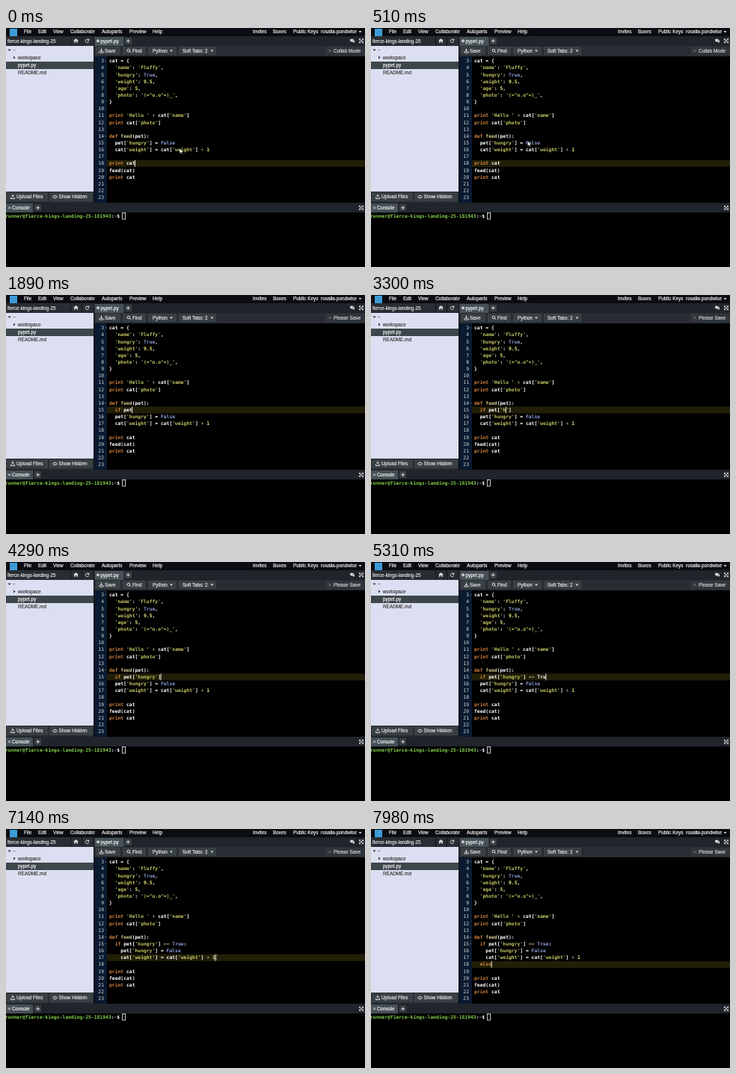
These frames come from a looping animation (480x320 px, 8000 ms). An HTML page:

```html
<!DOCTYPE html>
<html lang="en">
<head>
<meta charset="utf-8">
<title>Editing pypet.py</title>
<style>
  html, body { margin: 0; width: 100%; height: 100%; overflow: hidden; background: #000; }
  svg { display: block; width: 100vw; height: 100vh; }
  text { white-space: pre; }
  .ui { font: 6.4px "Liberation Sans", Arial, sans-serif; stroke-width: .15; }
  .code { font: bold 6.36px "DejaVu Sans Mono", monospace; fill: #fff; }
  .keyword { fill: #d5813c; }
  .string { fill: #c3c562; }
  .constant { fill: #8c9cd8; }
  .number { fill: #eaea80; }
  .name { fill: #cfc98a; }
  .operator { fill: #a59268; }
</style>
</head>
<body>
<svg id="stage" viewBox="0 0 480 320" xmlns="http://www.w3.org/2000/svg">
  <g id="chrome"></g>
  <g id="editor"></g>
  <path id="arrow" d="M0 0v7l1.7-1.5 1.2 2.6 1.1-.5-1.2-2.5h2.3z" fill="#fff" stroke="#000" stroke-width=".5"/>
  <path id="beam" d="M-1.5-3.5q1.5 0 1.5 1 0-1 1.5-1M0-2.5v5M-1.5 3.5q1.5 0 1.5-1 0 1 1.5 1" fill="none" stroke="#999" stroke-width=".8"/>
</svg>
<script>
const LOOP = 8000, STEP = 30;
const FIRST_LINE = 3, LAST_LINE = 23, LINE_HEIGHT = 9.15;
const CODE_X = 138, CHAR = 6.36 * 0.602;
const $ = id => document.getElementById(id);

const escapeText = s => s.replace(/&/g, '&amp;').replace(/</g, '&lt;');
const box = (x, y, w, h, fill, extra = '') =>
  `<rect x="${x}" y="${y}" width="${w}" height="${h}" fill="${fill}" ${extra}/>`;
const label = (x, y, s, color = '#eee', extra = '') =>
  `<text class="ui" x="${x}" y="${y + 2.2}" fill="${color}" stroke="${color}" ${extra}>${escapeText(s)}</text>`;
const icon = (x, y, d, color = '#ddd', fill = 'none') =>
  `<path transform="translate(${x} ${y})" d="${d}" fill="${fill}" stroke="${color}" stroke-width="1"/>`;
const solid = (x, y, d, color = '#ddd') =>
  `<path transform="translate(${x} ${y})" d="${d}" fill="${color}"/>`;

const DOWN = 'M-2-1h4l-2 2.6z', RIGHT = 'M-1-2l2.6 2-2.6 2z';
const PLUS = 'M-2.3 0h4.6M0-2.3v4.6', CROSS = 'M-1.5-1.5l3 3M1.5-1.5l-3 3';
const EXPAND = 'M-2.5-2.5l5 5M2.5-2.5l-5 5M-2.5-.8v-1.7h1.7M2.5-.8v-1.7h-1.7M-2.5.8v1.7h1.7M2.5.8v1.7h-1.7';

function drawChrome() {
  const bar = '#292d33', button = '#394044', line = '#11151c';
  const menu = [[24, 'File'], [43, 'Edit'], [63, 'View'], [86, 'Collaborate'], [128, 'Autoparts'],
    [165, 'Preview'], [196, 'Help'], [330, 'Invites'], [357, 'Boxes'], [384, 'Public Keys']];
  const prompt = 'runner@fierce-kings-landing-25-181943';
  $('chrome').innerHTML = [
    box(0, 0, 480, 320, '#000'),
    // menu bar
    box(0, 0, 480, 11, '#0b0d12'),
    box(5, 1, 10, 10, '#3d9bd8'),
    ...menu.map(([x, s]) => label(x, 5, s, '#fff')),
    label(469, 5, 'rosalia-pondwise', '#fff', 'text-anchor="end"'),
    solid(473.5, 5, DOWN),
    // file panel
    box(0, 11, 117, 13, bar),
    label(2, 17.3, 'fierce-kings-landing-25'),
    box(86, 11, 1, 13, line), box(101, 11, 1, 13, line),
    solid(93.5, 17, 'M0-3l3.4 3h-1v2.8h-1.6v-2h-1.6v2h-1.6v-2.8h-1z'),
    icon(108.5, 17.3, 'M2-1.2a2.3 2.3 0 1 0 .2 2M2.4-2.8v2h-2'),
    box(0, 24, 117, 195, '#dcdff1'),
    solid(4.5, 29.5, DOWN, '#333'), label(9, 29.5, '~', '#333'),
    solid(11, 39.5, RIGHT, '#333'), label(16, 39.5, 'workspace', '#333'),
    box(0, 45, 117, 10, '#3d474b'), label(16, 50, 'pypet.py', '#fff'),
    label(16, 60, 'README.md', '#333'),
    box(0, 219, 117, 15, bar),
    box(1, 220, 55, 12, button), box(58, 220, 58, 12, button),
    icon(9, 226, 'M-2.5.5v2h5v-2M0 1v-3.5M-1.6-1l1.6-1.6L1.6-1'),
    label(14, 226, 'Upload Files'),
    icon(65.5, 226, 'M-3 0q3-3.6 6 0-3 3.6-6 0zM-.4 0h.8'),
    label(70.5, 226, 'Show Hidden'),
    box(117, 11, 1.5, 223, line),
    // tabs
    box(118, 11, 362, 13, '#20242b'),
    box(118.5, 12, 39, 12, '#465056'),
    icon(123, 17.3, CROSS + PLUS), label(126.5, 17.3, 'pypet.py', '#fff'),
    box(159, 13, 9, 9, button), icon(163.3, 17.3, PLUS),
    solid(463, 17, 'M-2.8-2.3h4.2v3h-2.2l-1.3 1.3v-1.3h-.7zM1.8-.8h1.2v2.7h-.6v1.2l-1.2-1.2h-1.5v-.8h2.1z'),
    icon(475, 17.3, EXPAND),
    // toolbar
    box(118, 24, 362, 14, bar),
    box(120, 25, 33, 11, button), box(156, 25, 31, 11, button),
    box(190, 25, 38, 11, button), box(231, 25, 50, 11, button),
    icon(127.5, 30.5, 'M-2.5.5v2h5v-2M0-3v3.8M-1.6-.7l1.6 1.6L1.6-.7'),
    label(132, 30.5, 'Save'),
    icon(164.5, 30, 'M1.2 0a1.8 1.8 0 1 1-3.6 0a1.8 1.8 0 0 1 3.6 0M.8 1.2l2 2'),
    label(169, 30.5, 'Find'),
    label(196, 30.5, 'Python'), solid(221, 30.5, DOWN),
    label(236, 30.5, 'Soft Tabs: 2'), solid(275.5, 30.5, DOWN),
    box(427, 25, 52, 11, '#30363b'),
    icon(433, 30.5, CROSS, '#777'),
    label(474, 30.5, 'Collab Mode', '#ddd', 'id="status" text-anchor="end"'),
    // gutter
    box(118.5, 38, 16.5, 196, '#0a1a30'),
    // console
    box(0, 234, 480, 13, '#20242b'),
    box(0, 235, 36, 12, '#465056'),
    icon(4.5, 240.7, CROSS), label(8, 240.7, 'Console', '#fff'),
    box(38, 236, 9, 9, button), icon(42.7, 240.7, PLUS),
    icon(475, 240.7, EXPAND),
    `<text class="code" x="-1" y="253.5"><tspan fill="#83d04a">${prompt}</tspan>:<tspan fill="#8aa0e0">~</tspan>$</text>`,
    box(155.5, 247.5, 4, 8.5, 'none', 'stroke="#ddd" stroke-width=".9"')
  ].join('');
}

const SOURCE = `cat = {
  'name': 'Fluffy',
  'hungry': True,
  'weight': 9.5,
  'age': 5,
  'photo': '(=^o.o^=)_',
}

print 'Hello ' + cat['name']
print cat['photo']

def feed(pet):
  pet['hungry'] = False
  cat['weight'] = cat['weight'] + 1

print cat
feed(cat)
print cat`.split('\n');

// Each entry: time, then a key or a clicked [line, column].
const EDITS = [
  [780, [14, 14]], [1150, 'Enter'],
  ...typed('if pet', 1240, 78),
  [2250, '['], [2750, "'"], [3200, 'h'],
  ...typed('ungry', 3420, 135),
  ...typed("'] == True:", 4120, 137),
  [6000, [16, 2]], [6270, 'Tab'],
  [6690, [17, 2]], [6840, 'Tab'],
  [7050, [17, 37]], [7230, 'Enter'], [7350, 'Backspace'],
  ...typed('else', 7500, 120)
];

function typed(text, start, gap) {
  return [...text].map((key, i) => [start + i * gap, key]);
}

function editorAt(time) {
  const lines = [...SOURCE];
  let row = 18 - FIRST_LINE, col = 9, last = 0, dirty = false;
  for (const [when, input] of EDITS) {
    if (when > time) break;
    last = when;
    if (Array.isArray(input)) {
      row = input[0] - FIRST_LINE;
      col = Math.min(input[1], lines[row].length);
      continue;
    }
    dirty = true;
    const before = lines[row].slice(0, col), after = lines[row].slice(col);
    if (input === 'Enter') {
      const indent = before.match(/^ */)[0] + (before.endsWith(':') ? '  ' : '');
      lines.splice(row, 1, before, indent + after);
      row++;
      col = indent.length;
    } else if (input === 'Backspace') {
      lines[row] = before.slice(0, -2) + after;
      col -= 2;
    } else if (input === 'Tab') {
      lines[row] = before + '  ' + after;
      col += 2;
    } else {
      const closesPair = "]'".includes(input) && after[0] === input;
      const pair = { '[': '[]', "'": "''" }[input] || input;
      if (!closesPair) lines[row] = before + pair + after;
      col++;
    }
  }
  return { lines, row, col, dirty, caret: (time - last) % 1000 < 500 };
}

const TOKENS = /(?<string>'[^']*')|(?<name>(?<=def )\w+)|(?<keyword>\b(?:def|if|else|print)\b)|(?<constant>\b(?:True|False)\b)|(?<number>\b\d[\d.]*)|(?<operator>==|\+)/g;

function highlight(line) {
  return line.replace(TOKENS, (token, ...rest) => {
    const groups = rest.at(-1);
    const kind = Object.keys(groups).find(k => groups[k] !== undefined);
    return `<tspan class="${kind}">${token}</tspan>`;
  });
}

const lineY = row => 44 + row * LINE_HEIGHT;

function drawEditor(time) {
  const { lines, row, col, dirty, caret } = editorAt(time);
  const parts = [box(135, lineY(row) - 4.5, 345, 9.2, '#211f08')];
  for (let n = FIRST_LINE; n <= LAST_LINE; n++) {
    const y = lineY(n - FIRST_LINE), line = lines[n - FIRST_LINE] || '';
    parts.push(`<text class="code" x="131" y="${y + 2.2}" text-anchor="end" style="fill:#d8dcd0;font-weight:400">${n}</text>`);
    if (/[{:]$/.test(line)) parts.push(solid(133.2, y, 'M-1-.5h2l-1 1.3z', '#888'));
    parts.push(`<text class="code" xml:space="preserve" x="${CODE_X}" y="${y + 2.2}">${highlight(line)}</text>`);
  }
  if (caret) parts.push(box(CODE_X + col * CHAR - .3, lineY(row) - 4.3, .9, 8.8, '#fff'));
  $('editor').innerHTML = parts.join('');
  $('status').textContent = dirty ? 'Please Save' : 'Collab Mode';
}

const ARROW_PATH = [[0, 232, 161], [250, 232, 161], [720, 193, 144], [1000, 193, 144]];
const BEAM_PATH = [[5640, 193, 145], [5940, 146, 164], [6210, 146, 164], [6400, 146, 180],
  [6480, 146, 180], [6660, 146, 172], [6810, 146, 172], [7020, 281, 172], [7230, 281, 172]];

function movePointer(id, path, time) {
  const next = path.findIndex(p => p[0] > time);
  $(id).setAttribute('visibility', next > 0 ? 'visible' : 'hidden');
  if (next < 1) return;
  const [t0, x0, y0] = path[next - 1], [t1, x1, y1] = path[next];
  const u = (time - t0) / (t1 - t0), ease = u * u * (3 - 2 * u);
  $(id).setAttribute('transform', `translate(${x0 + (x1 - x0) * ease} ${y0 + (y1 - y0) * ease})`);
}

function render(now) {
  const time = Math.floor(now % LOOP / STEP) * STEP;
  drawEditor(time);
  movePointer('arrow', ARROW_PATH, time);
  movePointer('beam', BEAM_PATH, time);
}

let start;
function tick(now) {
  start ??= now;
  render(now - start);
  requestAnimationFrame(tick);
}

drawChrome();
render(0);
requestAnimationFrame(tick);
</script>
</body>
</html>
```
